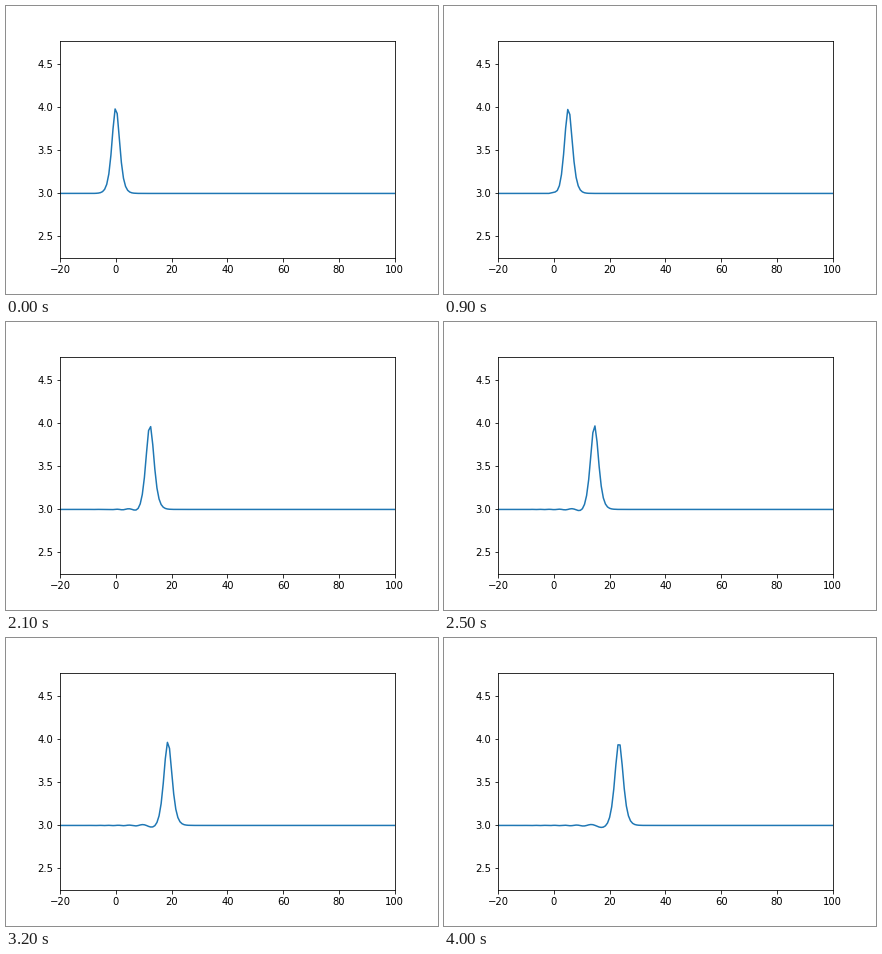
Recreate the animation shown at these times as a matplotlib script. Size 432 px wide and 288 px high, loop 4.1 s.

```python
import numpy as np
import matplotlib.pyplot as plt
from matplotlib.animation import FuncAnimation

# Pulse on a level surface, u_t + u u_x + B u_xxx = 0, solved spectrally
LEVEL = 3.0
B = 0.31
K = 0.55
FRAMES = 41
FRAME_DT = 0.1765
SUBSTEPS = 10
DX = 0.75

x = -0.25 + DX * np.arange(-80, 176)
q = 2 * np.pi * np.fft.rfftfreq(x.size, DX)
h = FRAME_DT / SUBSTEPS
half = np.exp(1j * (B * q**3 - LEVEL * q) * h / 2)
full = half**2


def steepen(s):
    return -0.5j * q * np.fft.rfft(np.fft.irfft(s, x.size) ** 2)


def step(s):
    """Integrating-factor RK4 step."""
    a = steepen(s)
    b = steepen(half * (s + h / 2 * a))
    c = steepen(half * s + h / 2 * b)
    d = steepen(full * s + h * half * c)
    return full * s + h / 6 * (full * a + 2 * half * (b + c) + d)


def solve():
    s = np.fft.rfft(np.cosh(K * x) ** -2)
    waves = []
    for _ in range(FRAMES):
        waves.append(LEVEL + np.fft.irfft(s, x.size))
        for _ in range(SUBSTEPS):
            s = step(s)
    return waves


waves = solve()

fig, ax = plt.subplots(figsize=(6, 4), dpi=72)
fig.subplots_adjust(left=0.125, right=0.9, bottom=0.125, top=0.88)
ax.set_xlim(-20, 100)
ax.set_ylim(2.25, 4.776)
line, = ax.plot(x, waves[0])


def draw(i):
    line.set_ydata(waves[i])
    return line,


anim = FuncAnimation(fig, draw, frames=FRAMES, interval=100, repeat=True)
plt.show()
```
